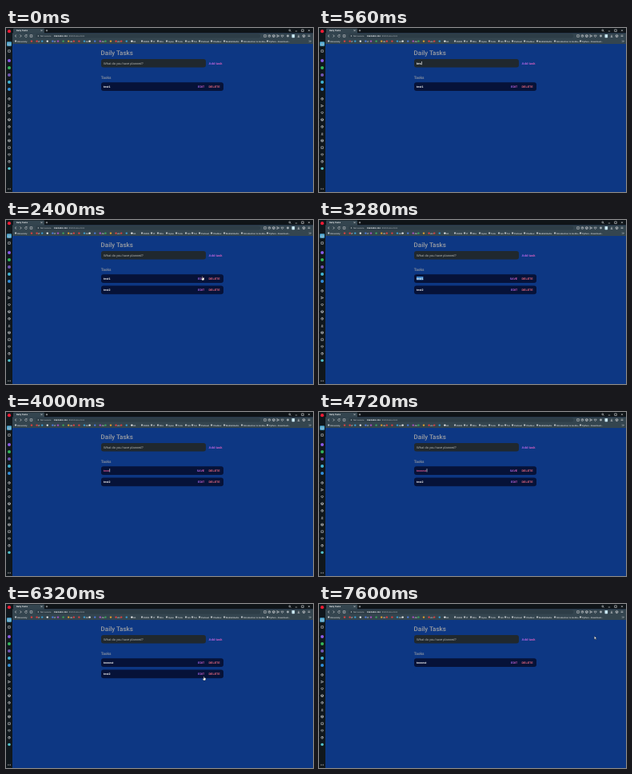
Animation, 384 px wide and 206 px high, one loop 7760 ms. Source, as an HTML page:

```html
<!DOCTYPE html>
<html lang="en">
<head>
<meta charset="utf-8">
<title>Daily Tasks</title>
<style>
html, body { margin: 0; width: 100%; height: 100%; overflow: hidden; background: #0d3783; }
svg { display: block; width: 100vw; height: 100vh; }
text { font-family: "Liberation Sans", Arial, sans-serif; white-space: pre; text-rendering: geometricPrecision; }
.head { font-family: Roboto, sans-serif; font-weight: 500; fill: #9a9da3; }
.task { font-size: 3.6px; font-weight: 700; fill: #fff; }
.btn { font-size: 3.6px; font-weight: 700; }
.bar { font-size: 2.6px; font-weight: 700; }
.line { fill: none; stroke: #c6cacd; stroke-width: .65; }
</style>
</head>
<body>
<svg viewBox="0 0 384 206">
  <defs>
    <linearGradient id="pinkish"><stop stop-color="#9d66f2"/><stop offset="1" stop-color="#ea5cb0"/></linearGradient>
  </defs>
  <rect width="384" height="206" fill="#0d3783"/>
  <g id="browser"></g>

  <text class="head" x="118.6" y="33.8" font-size="8">Daily Tasks</text>
  <rect x="119" y="39" width="131" height="10.4" rx="3" fill="#20282e"/>
  <text id="input" x="122" y="45.6" font-size="4"></text>
  <text id="add" x="253.6" y="45.6" font-size="4" font-weight="700" fill="url(#pinkish)">Add task</text>
  <text class="head" x="118.8" y="63.8" font-size="4.8">Tasks</text>

  <g id="first"></g>
  <g id="second" transform="translate(0 14.2)"></g>
  <rect id="caret" width=".6" height="4.2" fill="#fff"/>
  <g id="mouse" stroke="#111" stroke-width=".35" fill="#fff">
    <path id="arrow" d="M0 0V4.2L1 3.3L1.7 4.8L2.3 4.5L1.6 3.1H2.9Z"/>
    <path id="hand" d="M-.4 0H.3V1.6L2.2 2V3.8L1.6 5H-.6L-1.6 3L-1.2 2.6L-.4 3.2Z"/>
  </g>
</svg>
<script>
const LOOP = 7760, STEP = 80;
const $ = id => document.getElementById(id);
const rect = (x, y, w, h, fill, rx = 0) => `<rect x="${x}" y="${y}" width="${w}" height="${h}" rx="${rx}" fill="${fill}"/>`;
const dot = (x, y, r, fill) => `<circle cx="${x}" cy="${y}" r="${r}" fill="${fill}"/>`;
const label = (x, y, s, fill = '#c9cdd0') => `<text class="bar" x="${x}" y="${y}" fill="${fill}">${s}</text>`;
const line = (x, y, d) => `<path class="line" transform="translate(${x} ${y})" d="${d}"/>`;

const shapes = {
  back: 'M1 -1.4L-.8 0L1 1.4',
  next: 'M-1 -1.4L.8 0L-1 1.4',
  reload: 'M1 -1A1.4 1.4 0 1 0 1.4 .4M1.2 -1.6V-.8H.4',
  grid: 'M-1.3 -1.3H1.3V1.3H-1.3Z',
  home: 'M-1.6 .1L0 -1.5L1.6 .1M-1.1 0V1.5H1.1V0',
  ring: 'M-1.4 0A1.4 1.4 0 1 1 1.4 0A1.4 1.4 0 1 1 -1.4 0M0 -.9V0H.8',
  heart: 'M0 1.5L-1.5 0Q-1.4 -1.8 0 -.7Q1.4 -1.8 1.5 0Z',
  send: 'M-1.4 -1.4L1.6 0L-1.4 1.4L-.8 0Z',
  cube: 'M0 -1.6L1.5 -.7V.8L0 1.6L-1.5 .8V-.7ZM-1.5 -.7L0 .1L1.5 -.7M0 .1V1.6',
  cross: 'M-1 -1L1 1M1 -1L-1 1',
  plus: 'M-1.2 0H1.2M0 -1.2V1.2',
  minus: 'M-1.2 .8H1.2',
  find: 'M-1.2 -.3A1 1 0 1 1 .8 -.3A1 1 0 1 1 -1.2 -.3M.5 .5L1.4 1.4',
  down: 'M0 -1.4V.7M-.9 -.2L0 .7L.9 -.2M-1.3 1.4H1.3',
  menu: 'M-1.4 -.9H1.4M-1.4 .5H1.4'
};
const icon = (name, x, y) => line(x, y, shapes[name]);

function drawBrowser() {
  const panel = '#34454f';
  let s = rect(0, 0, 384, 6.6, '#0f1418') + rect(8, 6.4, 376, 13.6, panel) + rect(0, 0, 8, 206, '#10171c');
  // tabs and window buttons
  s += rect(9, .6, 39, 6.2, panel, 1) + label(13, 4.2, 'Daily Tasks', '#fff') + icon('cross', 44.5, 3.2) + icon('plus', 51, 3.2);
  s += ['find', 'minus', 'grid', 'cross'].map((n, i) => icon(n, 355 + i * 8, 3.2)).join('');
  // address row
  s += ['back', 'next', 'reload', 'grid'].map((n, i) => icon(n, 12 + i * 6.5, 10)).join('');
  s += rect(37, 7.4, 281, 5.2, '#2d3d47', 2) + dot(40.4, 10, .8, '#b0b5b9');
  s += label(43, 10.9, 'Not secure', '#a4aaae') + label(60, 10.9, '192.168.1.104', '#fff');
  s += label(78, 10.9, ':5500/index.html', '#8b9499');
  s += ['grid', 'ring', 'cube', 'send', 'heart'].map((n, i) => icon(n, 324 + i * 5.4, 10)).join('');
  s += dot(352.5, 10, 1.4, '#aab2b8') + rect(357.5, 8, 3.6, 4.2, '#c8e6f4', .6);
  s += icon('down', 366, 10) + icon('cube', 372.5, 10) + icon('menu', 379, 10);
  // bookmarks
  const folder = (x, t) => rect(x - 3, 15.4, 2.2, 2, '#b9bfc3', .3) + label(x, 17.5, t);
  s += folder(14, 'University');
  const hues = ['#e04040', '#eee', '#3ba55d', '#d84040', '#4b7be0', '#e0a030', '#38a0d8', '#a94fc2'];
  for (let i = 0; i < 20; i++) {
    s += dot(32 + i * 6.6, 16.6, 1.2, hues[i * 3 % 8]);
    if (i % 3 == 1) s += label(33.7 + i * 6.6, 17.5, ['JS', 'IT', 'A1'][i % 7 % 3]);
  }
  [[172, '25000'], [184, 'IT'], [192, 'Rits'], [203, 'Icpou'], [215, 'Toile'], [227, 'Git'], [235, 'Tor'],
   [244, 'Podcast'], [259, 'Chatbox'], [275, 'MobileStudio'], [297, 'Introduction to Go Ba...'],
   [329, 'Python - Download...']].forEach(([x, t]) => s += folder(x, t));
  s += line(380, 16.6, 'M-1 -1L0 0L-1 1M.4 -1L1.4 0L.4 1');
  // sidebar
  s += dot(4, 4.2, 2.1, '#ee1c35') + rect(1, 17.2, 6, 5.6, '#48a5cf', 1) + icon('home', 4, 20) + icon('grid', 4, 29);
  ['#8a5ae8', '#35b85a', '#7257b8', '#41b6d6', '#328edb'].forEach((c, i) => s += dot(4, 41 + i * 9, 2, c));
  ['ring', 'send', 'heart', 'cube', 'ring', 'down', 'cube', 'grid', 'heart', 'ring']
    .forEach((n, i) => s += icon(n, 4, 89 + i * 8.75));
  s += dot(4, 176.5, 1.8, '#51bfc9');
  for (const x of [2.5, 4, 5.5]) s += dot(x, 202, .5, '#d8dadc');
  $('browser').innerHTML = s;
}

function drawTask(id) {
  $(id).innerHTML = rect(119, 68.2, 153, 10.8, '#061238', 3) +
    `<rect class="mark" x="122" y="71" width="8.4" height="4.4" fill="#3c83c8"/>
     <text class="task" x="122" y="74.7"></text>
     <text class="btn edit" x="248.2" y="74.7" text-anchor="end" fill="url(#pinkish)"></text>
     <text class="btn" x="253.5" y="74.7" fill="#ec6a80">DELETE</text>`;
}

// the last entry whose time has passed
const at = (t, list) => list.filter(k => k[0] <= t).pop()[1];

const typed = [[0, ''], [400, 't'], [480, 'te'], [560, 'tes'], [640, 'test'], [1040, 'test2'], [2000, '']];
const renamed = [[0, 'test1'], [3520, 't'], [3680, 'te'], [3840, 'tee'], [4000, 'teee'], [4240, 'teeee'],
  [4400, 'teeees'], [4560, 'teeeest']];

// time, x, y; a missing position hides the pointer
const path = [[0], [160, 212, 58], [400, 180, 45], [401], [1280, 180, 45], [1360, 188, 45], [1520, 205, 45],
  [1760, 267.6, 43.6], [2000, 267.6, 43.6], [2480, 244, 73], [2640, 244, 73], [2880, 131, 73], [3041],
  [4880, 160, 76], [5440, 244, 73], [5760, 244, 73], [6080, 247, 82], [6320, 247.6, 91],
  [6480, 260, 87], [6640, 260, 87], [6960, 330, 48], [7200, 344.4, 40.2], [7760, 344.4, 40.2]];

function pointer(t) {
  const i = path.findIndex(k => k[0] > t), a = path[i - 1], b = path[i];
  if (a.length < 2) return null;
  if (b.length < 2) return [a[1], a[2]];
  const u = (t - a[0]) / (b[0] - a[0]), e = u * u * (3 - 2 * u);
  return [a[1] + (b[1] - a[1]) * e, a[2] + (b[2] - a[2]) * e];
}

const show = (el, on) => el.style.display = on ? '' : 'none';

function setTask(id, name, editing, marked) {
  const g = $(id), text = g.querySelector('.task');
  text.textContent = name;
  text.style.fill = editing && !marked ? '#e45a96' : '#fff';
  g.querySelector('.edit').textContent = editing ? 'SAVE' : 'EDIT';
  show(g.querySelector('.mark'), marked);
  return text;
}

function render(t) {
  const value = at(t, typed), input = $('input');
  input.textContent = value || 'What do you have planned?';
  input.setAttribute('fill', value ? '#fff' : '#b4b6b4');
  input.setAttribute('font-weight', value ? 700 : 400);

  const editing = t >= 2640 && t < 5600;
  const name = setTask('first', at(t, renamed), editing, t >= 3040 && t < 3520);
  setTask('second', 'test2', false, false);
  show($('second'), t >= 2000 && t < 6640);

  const caret = $('caret'), active = value ? input : t >= 3520 && t < 5440 ? name : null;
  show(caret, active);
  if (active) {
    caret.setAttribute('x', 122.3 + active.getComputedTextLength());
    caret.setAttribute('y', value ? 42 : 71.2);
  }

  const p = pointer(t);
  show($('mouse'), p);
  let overAdd = false;
  if (p) {
    const [x, y] = p;
    overAdd = x > 253 && x < 272 && y > 39 && y < 50;
    const overTask = x > 238 && x < 270 && y > 68 && y < 94;
    $('mouse').setAttribute('transform', `translate(${x} ${y})`);
    show($('hand'), overAdd || overTask);
    show($('arrow'), !overAdd && !overTask);
  }
  $('add').setAttribute('opacity', overAdd ? .8 : 1);
}

drawBrowser();
drawTask('first');
drawTask('second');
const start = performance.now();
function frame() {
  const t = (performance.now() - start) % LOOP;
  render(Math.floor(t / STEP) * STEP);
  requestAnimationFrame(frame);
}
frame();
</script>
</body>
</html>
```
